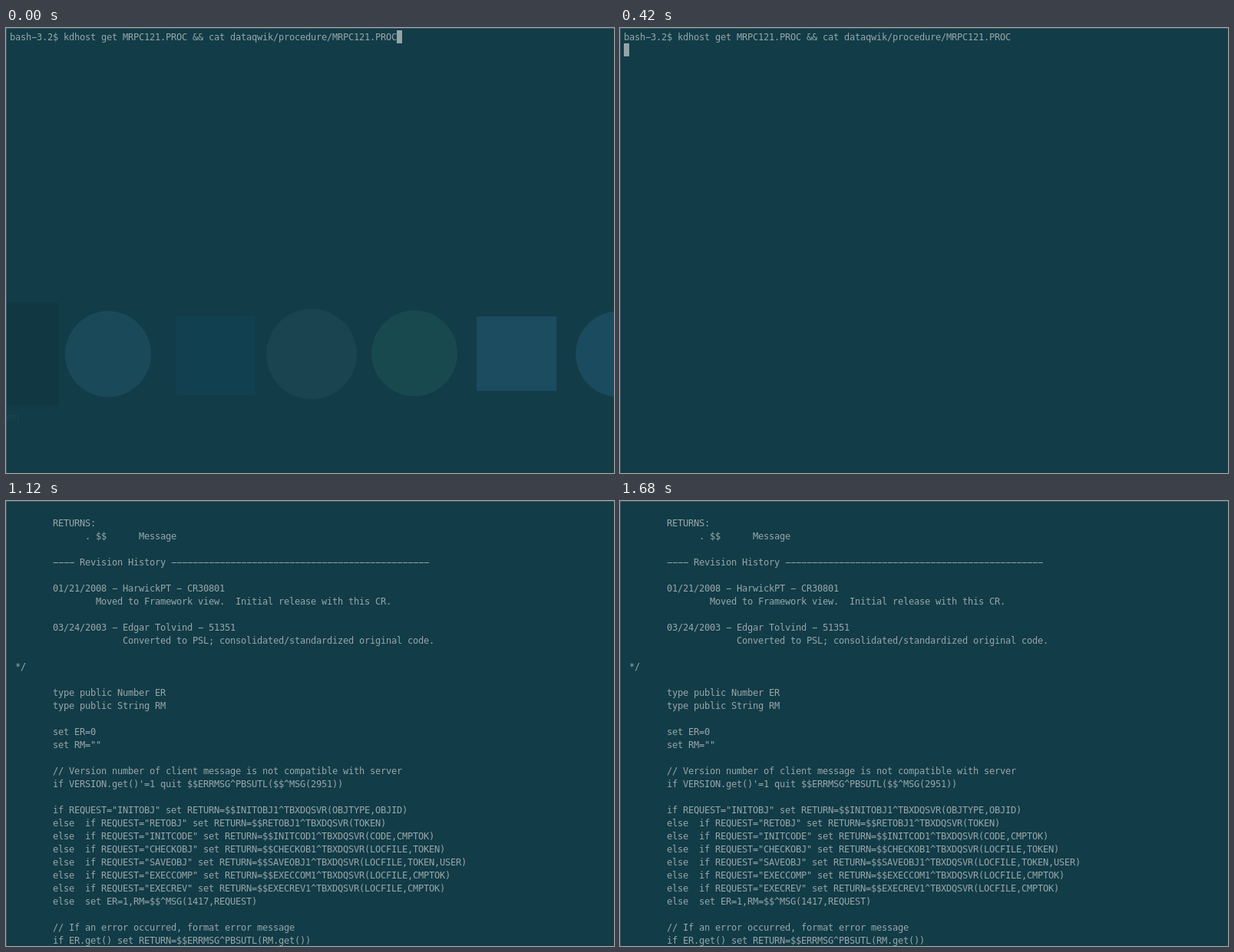
Animation of 792x580 px, one loop 1960 ms. Source, as an HTML page:

```html
<!DOCTYPE html>
<html lang="en">
<head>
<meta charset="utf-8">
<title>Terminal session</title>
<style>
  html, body { margin: 0; width: 100%; height: 100%; overflow: hidden; background: #123c47; }
  svg { display: block; width: 792px; height: 580px; }
  text {
    font: 12px "DejaVu Sans Mono", monospace;
    letter-spacing: -0.2246px; /* snaps the advance to a 7px cell */
    white-space: pre;
    fill: #98a7aa;
  }
</style>
</head>
<body>
<svg id="stage" viewBox="0 0 792 580">
  <rect width="792" height="580" fill="#123c47"/>
  <g id="dock">
    <rect x="-66" y="358" width="134" height="134" fill="#103742"/>
    <circle cx="133" cy="425" r="56" fill="#1a4a5a"/>
    <rect x="222" y="376" width="102" height="102" fill="#114151"/>
    <circle cx="398" cy="425" r="59" fill="#194450"/>
    <circle cx="532" cy="424" r="56" fill="#18494f"/>
    <rect x="613" y="376" width="104" height="97" fill="#1b4c5f"/>
    <circle cx="798" cy="425" r="56" fill="#1a4b5e"/>
    <text x="1" y="511" style="fill:#21464f;font-family:'Open Sans',sans-serif">rm</text>
  </g>
  <g id="prompt"></g>
  <g id="listing"></g>
  <rect id="cursor" width="7" height="17" fill="#94a4a8"/>
  <path d="M0 .5H792M.5 0V580" stroke="#3d5861" fill="none"/>
</svg>
<script>
const LOOP = 1960, DOCK_END = 70, ENTER = 420, OUTPUT = 1050;
const CELL = 7, ROW = 17, LEFT = 5, TOP = 3;
const $ = id => document.getElementById(id);

const command = 'bash-3.2$ kdhost get MRPC121.PROC && cat dataqwik/procedure/MRPC121.PROC';
const code = `
        RETURNS:
              . $$      Message

        ---- Revision History ${'-'.repeat(48)}

        01/21/2008 - HarwickPT - CR30801
                Moved to Framework view.  Initial release with this CR.

        03/24/2003 - Edgar Tolvind - 51351
                     Converted to PSL; consolidated/standardized original code.

 */

        type public Number ER
        type public String RM

        set ER=0
        set RM=""

        // Version number of client message is not compatible with server
        if VERSION.get()'=1 quit $$ERRMSG^PBSUTL($$^MSG(2951))

        if REQUEST="INITOBJ" set RETURN=$$INITOBJ1^TBXDQSVR(OBJTYPE,OBJID)
        else  if REQUEST="RETOBJ" set RETURN=$$RETOBJ1^TBXDQSVR(TOKEN)
        else  if REQUEST="INITCODE" set RETURN=$$INITCOD1^TBXDQSVR(CODE,CMPTOK)
        else  if REQUEST="CHECKOBJ" set RETURN=$$CHECKOB1^TBXDQSVR(LOCFILE,TOKEN)
        else  if REQUEST="SAVEOBJ" set RETURN=$$SAVEOBJ1^TBXDQSVR(LOCFILE,TOKEN,USER)
        else  if REQUEST="EXECCOMP" set RETURN=$$EXECCOM1^TBXDQSVR(LOCFILE,CMPTOK)
        else  if REQUEST="EXECREV" set RETURN=$$EXECREV1^TBXDQSVR(LOCFILE,CMPTOK)
        else  set ER=1,RM=$$^MSG(1417,REQUEST)

        // If an error occurred, format error message
        if ER.get() set RETURN=$$ERRMSG^PBSUTL(RM.get())`;

function print(group, lines) {
  lines.forEach((line, row) => {
    const body = line.trimStart();
    if (!body) return;
    const el = document.createElementNS('http://www.w3.org/2000/svg', 'text');
    el.setAttribute('x', LEFT + CELL * (line.length - body.length));
    el.setAttribute('y', TOP + 13 + ROW * row);
    el.textContent = body.replace(/-/g, '\u2212'); // wide terminal dash
    group.append(el);
  });
}

const show = (id, on) => $(id).setAttribute('visibility', on ? 'visible' : 'hidden');

function render(t) {
  const entered = t >= ENTER, output = t >= OUTPUT;
  show('dock', t < DOCK_END);
  show('prompt', !output);
  show('listing', output);
  show('cursor', !output);
  $('cursor').setAttribute('x', entered ? LEFT : LEFT + CELL * command.length);
  $('cursor').setAttribute('y', entered ? TOP + ROW : TOP);
}

print($('prompt'), [command]);
print($('listing'), code.split('\n'));

const start = performance.now();
function tick() {
  render((performance.now() - start) % LOOP);
  requestAnimationFrame(tick);
}
render(0);
requestAnimationFrame(tick);
</script>
</body>
</html>
```
